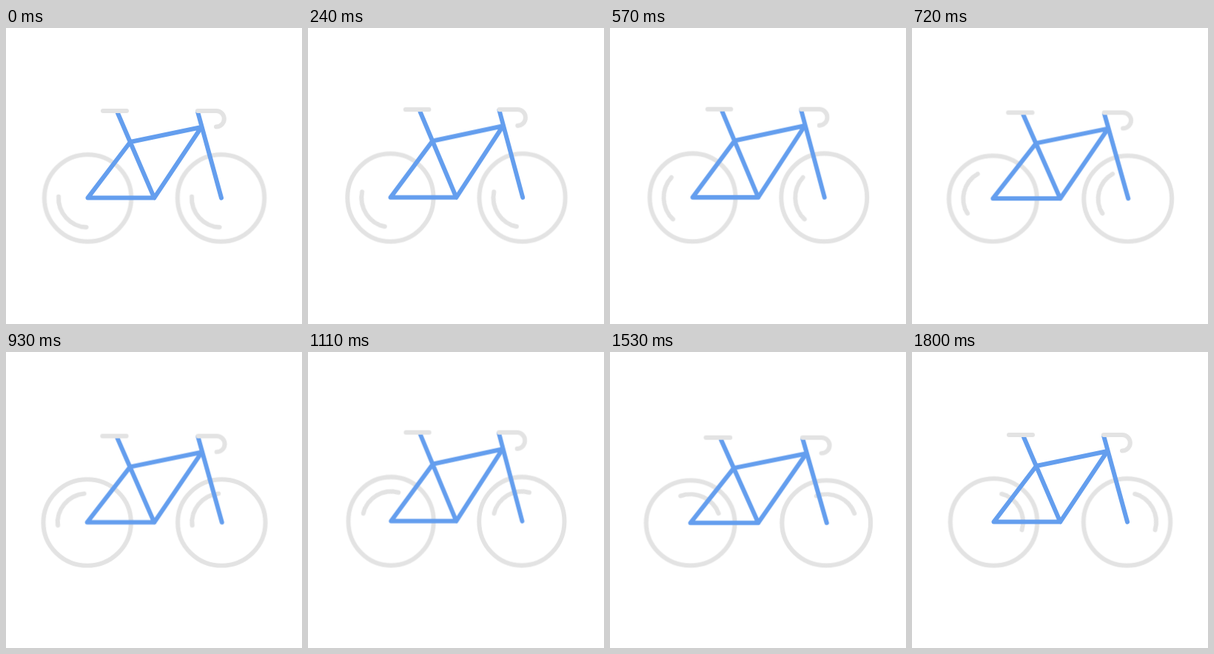
Recreate the animation shown at these times as an HTML page without scripts. Size 400 by 400 pixels, loop 1.89 s.

```html
<!DOCTYPE html>
<html lang="en">
<head>
<meta charset="utf-8">
<title>Bicycle</title>
<style>
  html, body { margin: 0; width: 100%; height: 100%; overflow: hidden; background: #fff; }
  svg { display: block; width: 100vw; height: 100vh; }
  .bike {
    fill: none; stroke-width: 6; stroke-linecap: round; stroke-linejoin: round;
    transform-origin: 200.5px 291.5px;
    animation: squash 1890ms infinite;
  }
  .grey { stroke: #e3e3e3; }
  .blue { stroke: #649eee; }
  .spin { transform-origin: 0 0; animation: spin 1890ms infinite; }
  .bike, .spin { animation-timing-function: cubic-bezier(.333, 0, .667, 1); }

  /* two turns, then a short rest */
  @keyframes spin {
    0% { transform: rotate(0deg); }
    95.238%, 100% { transform: rotate(720deg); }
  }
  @keyframes squash {
    0%, 95.238%, 100% { transform: scale(1, 1); }
    25.4%, 61.11% { transform: scale(.98, 1.02); }
    42.86%, 80.95% { transform: scale(1.02, .98); }
  }
</style>
</head>
<body>
<svg viewBox="0 0 400 400">
  <defs>
    <g id="wheel">
      <circle r="58.7"/>
      <path class="spin" d="M-39.5 0A39.5 39.5 0 0 0 0 39.5"/>
    </g>
  </defs>
  <g class="bike">
    <g class="grey">
      <use href="#wheel" x="110.5" y="229.8"/>
      <use href="#wheel" x="290.5" y="229.8"/>
    </g>
    <g class="blue">
      <path d="M151 115L200.3 229.6H110.5L168 154L264 134L200.3 229.6"/>
      <path d="M259 113L291 229.6"/>
    </g>
    <g class="grey">
      <path d="M131 112H163"/>
      <path d="M259 112H284A10.8 10.8 0 0 1 284 133.6"/>
    </g>
  </g>
</svg>
</body>
</html>
```
